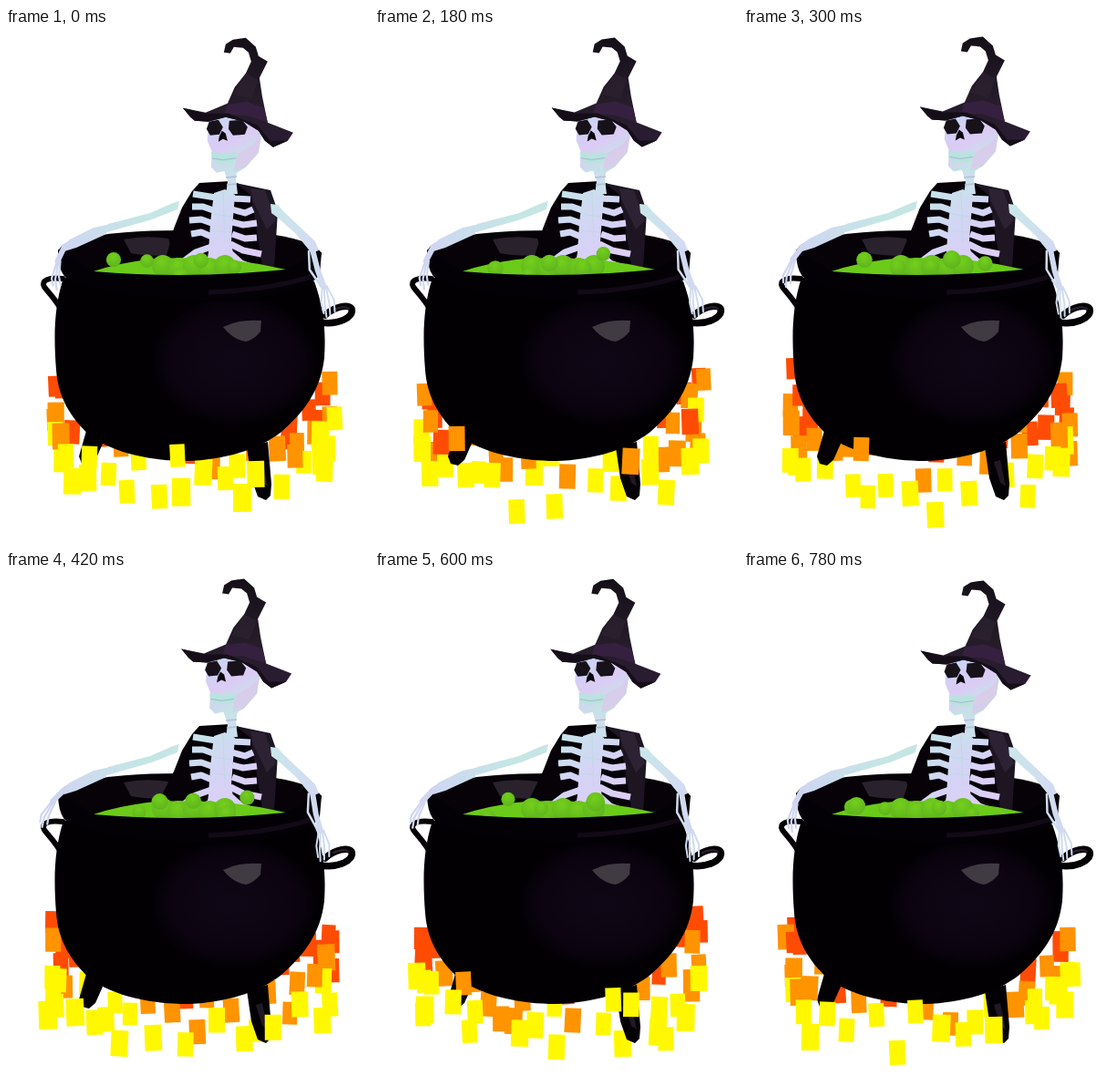
Recreate the animation shown at these times as an HTML page. Size 398 by 565 pixels, loop 0.84 s.

```html
<!DOCTYPE html>
<html lang="en">
<head>
<meta charset="utf-8">
<title>Skeleton in a cauldron</title>
<style>
html, body { margin: 0; width: 100%; height: 100%; overflow: hidden; background: #fff; }
svg { display: block; width: 100%; height: 100%; }
</style>
</head>
<body>
<svg viewBox="0 0 398 565" xmlns="http://www.w3.org/2000/svg">
  <defs>
    <linearGradient id="bone" gradientUnits="userSpaceOnUse" x1="205" y1="170" x2="275" y2="262">
      <stop offset="0" stop-color="#c4e6e8"/><stop offset=".5" stop-color="#d4d4f5"/><stop offset="1" stop-color="#e0ccf6"/>
    </linearGradient>
    <linearGradient id="skull" x1="0" y1="0" x2=".5" y2="1">
      <stop offset="0" stop-color="#c6d8f4"/><stop offset=".55" stop-color="#dbcbf5"/><stop offset="1" stop-color="#bfe8e2"/>
    </linearGradient>
    <linearGradient id="arm" gradientUnits="userSpaceOnUse" x1="60" y1="240" x2="350" y2="260">
      <stop offset="0" stop-color="#d0d6f3"/><stop offset=".3" stop-color="#c4e6e4"/><stop offset=".8" stop-color="#cae6ea"/><stop offset="1" stop-color="#d6d8f5"/>
    </linearGradient>
    <radialGradient id="sheen">
      <stop offset="0" stop-color="#0f0715"/><stop offset=".75" stop-color="#0b0410"/><stop offset="1" stop-color="#020003"/>
    </radialGradient>
    <linearGradient id="hatFill" x1="0" y1="0" x2="0" y2="1">
      <stop offset="0" stop-color="#151018"/><stop offset=".6" stop-color="#261c2a"/><stop offset="1" stop-color="#2a1c33"/>
    </linearGradient>
    <radialGradient id="ball" cx=".45" cy=".3" r=".75">
      <stop offset="0" stop-color="#74cf1c"/><stop offset="1" stop-color="#5cb21d"/>
    </radialGradient>
  </defs>

  <g id="fireBack"></g>

  <!-- legs -->
  <g fill="#040105">
    <path d="M90 435L106 456L98 474L91 480L83 478L80 470Z"/>
    <path d="M264 460L287 454L291 500L290 513L285 518L276 514L269 494Z"/>
    <path d="M274 476L281 474L287 503L281 499Z" fill="#211825"/>
  </g>

  <!-- back of the rim -->
  <path d="M57 246Q59 236 80 231Q125 222 190 222L295 227Q338 234 346 247L340 272H65Z" fill="#060208"/>
  <path d="M129 232Q152 227 178 231L184 249Q158 251 137 247Z" fill="#29222d"/>

  <!-- jacket and ribs -->
  <path id="coat" fill="#060208"/>
  <path d="M252 170L290 178L298 201L294 264L282 267L277 235L268 183Z" fill="#1d1522"/>
  <path d="M268 176L284 178L296 211L286 221L271 190Z" fill="#2d2233"/>
  <g fill="none" stroke="url(#bone)" stroke-width="7" stroke-linejoin="round">
    <path d="M230 186L205 182M230 201L216 196L204 196M228 215L214 210L201 211M228 230L214 224L203 226M228 239L208 246L188 261M230 249L212 263"/>
    <path d="M248 187L268 188M248 199L262 203L271 199M248 213L260 216L275 214M248 226L262 231L275 230M246 237L260 244L280 248M246 247L258 258L272 263"/>
  </g>
  <path d="M228 181L240 177L251 183L249 208L247 234L252 270H218L222 246L224 214Z" fill="url(#bone)"/>
  <path d="M238 180L240 236M227 204L248 207M226 222L247 224" stroke="#bcd8e1" fill="none" opacity=".7"/>
  <path d="M238 153L254 152L252 166L254 182L241 183L243 168Z" fill="#cbdfec"/>
  <path d="M241 164L253 163M242 172L253 171" stroke="#b6bed8" stroke-width="1.5"/>

  <!-- brew -->
  <path d="M96 267Q125 257 165 253Q240 249 307 265L306 285H96Z" fill="#6bcb19"/>
  <g id="bubbles" fill="url(#ball)"></g>

  <!-- pot -->
  <g fill="none" stroke="#040105" stroke-linecap="round">
    <path d="M62 275C47 273 38 277 42 284C47 291 56 299 62 312" stroke-width="6"/>
    <path d="M345 323C363 326 382 318 379 308C375 303 361 305 350 315" stroke-width="7.5"/>
    <path d="M359 309Q370 304 376 308" stroke="#2b2330" stroke-width="2"/>
  </g>
  <path d="M63 274C53 305 52 336 55 375C57 404 70 427 92 447C118 467 162 475 198 475C240 474 278 462 302 443C326 422 345 398 349 362C351 330 348 306 338 278Z" fill="#020003"/>
  <ellipse cx="250" cy="365" rx="94" ry="72" fill="url(#sheen)"/>
  <path d="M57 243L96 267Q200 276 306 265L346 246L344 270Q335 286 290 294Q235 302 170 297Q95 291 67 275Q57 268 57 243Z" fill="#040106"/>
  <path d="M238 328Q255 319 280 321L279 333Q272 342 263 344Q249 342 238 328Z" fill="#403b42"/>
  <path d="M222 290Q285 288 334 273" fill="none" stroke="#120a17" stroke-width="5"/>

  <!-- arms -->
  <g fill="url(#arm)">
    <path d="M190 190L183 192L158 203L112 215L103 221L111 224L160 210L188 199Z"/>
    <path d="M110 216L96 219L70 232L61 240L64 245L77 241L110 226Z"/>
    <path d="M290 193L298 194L304 201L322 218L339 234L343 244L335 247L318 226L299 209L291 203Z"/>
  </g>
  <g id="handL" fill="none" stroke="#d0d6f0" stroke-linecap="round">
    <path d="M64 240L57 256" stroke-width="6"/>
    <path d="M57 254L51 275L53 283M58 256L55 276L57 287M60 256L59 273L61 282" stroke-width="2.2"/>
  </g>
  <g id="handR" fill="none" stroke="#d0dbf0" stroke-linecap="round">
    <path d="M336 243L342 266L349 284" stroke-width="6"/>
    <path d="M332 245L333 265L346 284" stroke-width="2.5"/>
    <path d="M347 284L346 301L349 313M349 284L350 303L352 317M351 284L355 302L356 315M352 283L360 298L361 311" stroke-width="2"/>
  </g>

  <!-- head -->
  <g id="head">
    <path d="M222 99L221 124L226 136L225 153L231 159L241 157L252 160L263 153L270 145L277 137L280 120L280 103L260 95Z" fill="url(#skull)"/>
    <path d="M253 139L270 129L279 120L277 137L263 153L250 158Z" fill="#dfc6ec" opacity=".7"/>
    <path d="M225 136L238 138L251 137L255 140L249 148L231 149L226 144Z" fill="#b9e3df"/>
    <path d="M226 143L238 145L252 143" stroke="#a9b7d0" fill="none"/>
    <path d="M223 103L233 101L238 109L234 117L224 118L220 111ZM245 102L259 101L265 109L262 117L249 118L244 111Z" fill="#171119"/>
    <path d="M237 113L241 116L243 124L238 122L233 125L234 119Z" fill="#0c070e"/>
    <path d="M239 27L241 18L249 13L263 11L274 21L277 31L287 37L278 55L281 75L287 104L315 115L309 124L293 131L284 124L277 113L261 103L241 98L222 103L207 102L202 98L194 88L219 93L243 83L251 65L263 50L269 37L266 27L260 22L250 21L246 28Z" fill="url(#hatFill)"/>
    <path d="M243 84L264 81L283 88L287 104L263 96L239 95Z" fill="#35213f"/>
    <path d="M263 50L277 57L269 78L249 73Z" fill="#2c2230" opacity=".7"/>
    <path d="M194 88L219 94L244 94L276 107L290 124L309 124L293 131L284 124L277 113L261 103L241 98L222 103L207 102Z" fill="#150e18"/>
  </g>

  <g id="fireFront"></g>
</svg>
<script>
const LOOP = 840, STEP = 60, LIFE = 420;
const SPARKS = 110, BUBBLES = 14;
const GOLDEN = 0.618034;
const TONES = ['#fff800', '#ff9300', '#ff4c05'];

const $ = id => document.getElementById(id);
const mod = n => ((n % LOOP) + LOOP) % LOOP;
const circle = (x, y, r) => `<circle cx="${x}" cy="${y}" r="${r}"/>`;

function seeded(seed) {
  return () => {
    seed = (seed * 16807) % 2147483647;
    return seed / 2147483647;
  };
}
const rnd = seeded(4127);
const between = (a, b) => a + (b - a) * rnd();

// Sparks start on the front half of a ring around the pot's foot.
const sparks = Array.from({ length: SPARKS }, (_, i) => {
  const angle = Math.PI * ((i * GOLDEN) % 1);
  return {
    x: 202 + 153 * Math.cos(angle) + between(-6, 6),
    y: 474 + 50 * Math.sin(angle) + between(-14, 14),
    birth: i / SPARKS * LOOP,
    size: between(15.5, 19),
    tilt: between(-3, 3),
    heat: between(-0.25, 0.25),
    front: rnd() < 0.22
  };
});

// Bubbles swell out of the brew in turn and pop at their highest point.
const bubbles = Array.from({ length: BUBBLES }, (_, i) => ({
  x: 118 + 155 * ((i * GOLDEN) % 1),
  r: between(7, 11),
  top: between(238, 256),
  pop: (i + 0.5) / BUBBLES * LOOP
}));

function drawFire(t) {
  let back = '', front = '';
  for (const s of sparks) {
    const age = mod(t - s.birth) / LIFE;
    if (age >= 1) continue;
    const heat = age + s.heat;
    const tone = heat < 0.36 ? 0 : heat < 0.68 ? 1 : 2;
    const y = s.y - 100 * age;
    const w = s.size * (1.08 - 0.15 * age), h = w * 1.52;
    const rect = `<rect x="${s.x - w / 2}" y="${y - h / 2}" width="${w}" height="${h}" fill="${TONES[tone]}" transform="rotate(${s.tilt} ${s.x} ${y})"/>`;
    if (s.front && age < 0.5) front += rect;
    else back += rect;
  }
  $('fireBack').innerHTML = back;
  $('fireFront').innerHTML = front;
}

function drawBubbles(t) {
  let out = '';
  for (let i = 0; i < 5; i++) out += circle(172 + i * 17, 261 + i % 2 * 3, 12);
  for (const b of bubbles) {
    const left = mod(b.pop - t);
    if (left < 300) out += circle(b.x, b.top + left * 0.08, b.r);
  }
  $('bubbles').innerHTML = out;
}

function draw(t) {
  const sway = (1 - Math.cos((t - 70) / LOOP * 2 * Math.PI)) / 2;
  const pose = (id, value) => $(id).setAttribute('transform', value);
  pose('head', `translate(${-2 * sway} ${-2.8 * sway})`);
  pose('handL', `rotate(${24 * sway} 64 240)`);
  pose('handR', `rotate(${6 * sway} 336 243)`);
  $('coat').setAttribute('d', `M212 170L246 168L270 176L282 240L280 266H200L${176 - 9 * sway} 252L184 220L193 197L204 179Z`);
  drawFire(t);
  drawBubbles(t);
}

const start = performance.now();
let last = -1;
function tick() {
  const t = Math.floor(mod(performance.now() - start) / STEP) * STEP;
  if (t !== last) draw(last = t);
  requestAnimationFrame(tick);
}
tick();
</script>
</body>
</html>
```
